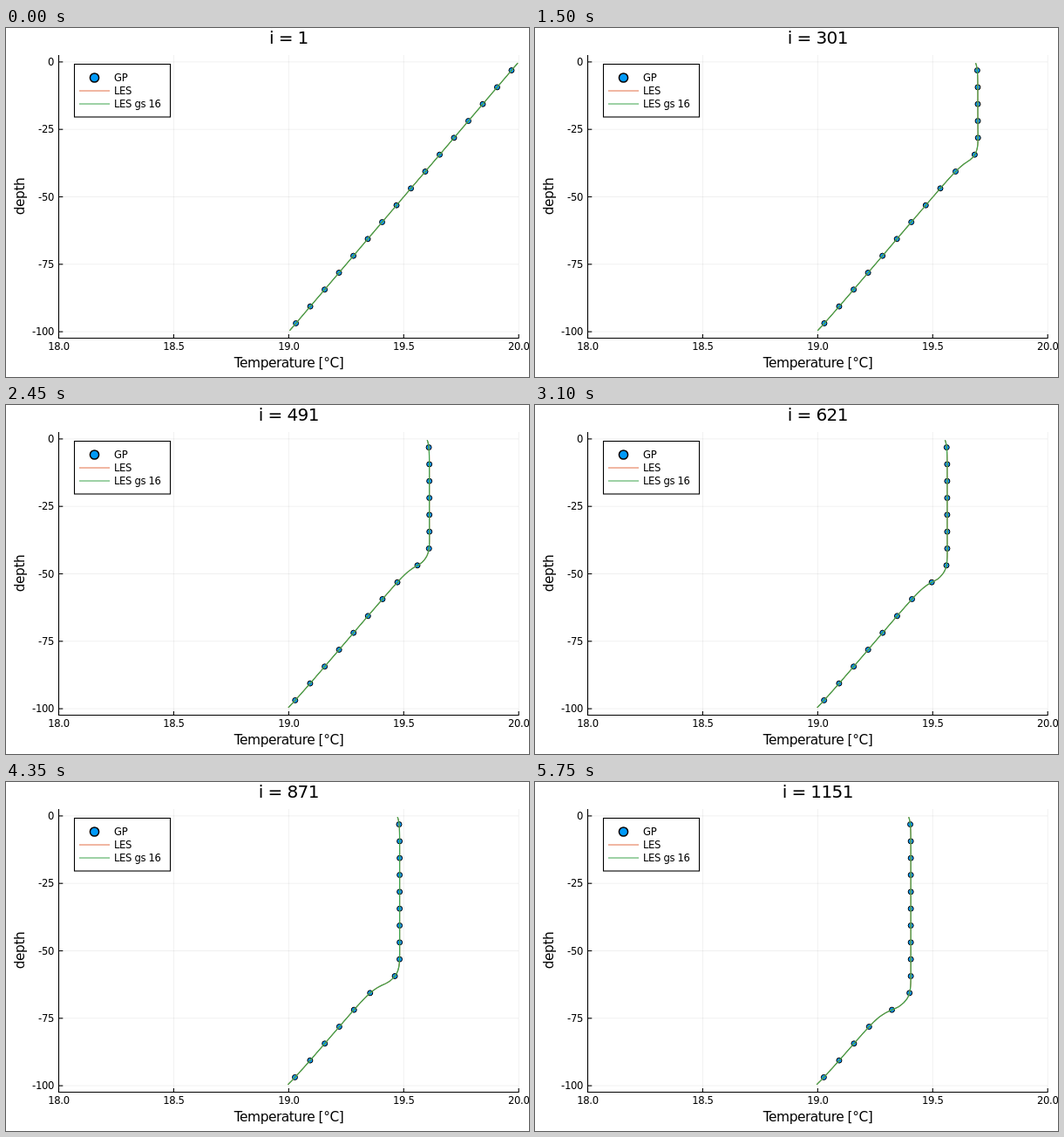
Animation of 600 by 400 pixels, one loop 5800 ms. Source, as an HTML page with a canvas:

```html
<!DOCTYPE html>
<html>
<head>
<meta charset="utf-8">
<style>
html, body { margin: 0; width: 100%; height: 100%; overflow: hidden; background: #fff; }
canvas { display: block; }
</style>
</head>
<body>
<canvas id="stage" width="600" height="400"></canvas>
<script>
const ctx = document.getElementById('stage').getContext('2d');
const BLUE = '#009af9', ORANGE = '#e26f46', GREEN = '#3da44d';
const STEP = 50, STEPS = 116;
const X_SCALE = 263.85;            // pixels per degree
const xOf = temp => 588.2 + (temp - 20) * X_SCALE;
const yOf = depth => 38.9 + depth * 3.092;

function line(points, color, width = 1.1) {
  ctx.beginPath();
  points.forEach(([x, y]) => ctx.lineTo(x, y));
  ctx.strokeStyle = color;
  ctx.lineWidth = width;
  ctx.stroke();
}

function dot(x, y, r, width) {
  ctx.beginPath();
  ctx.arc(x, y, r, 0, 2 * Math.PI);
  ctx.fillStyle = BLUE;
  ctx.fill();
  ctx.strokeStyle = '#000';
  ctx.lineWidth = width;
  ctx.stroke();
}

function text(str, x, y, size, align = 'center') {
  ctx.font = size + 'px "DejaVu Sans", sans-serif';
  ctx.letterSpacing = -0.03 * size + 'px';
  ctx.textAlign = align;
  ctx.fillStyle = '#000';
  ctx.fillText(str, x, y);
}

// A mixed layer cools and deepens with the square root of time.
function temperature(depth, k) {
  const initial = 20 - depth / 100;
  if (!k) return initial;
  const drop = 0.0555 * Math.sqrt(k);
  const base = 120.5 * drop - 0.7;
  const u = depth - base;
  const decay = u < 0 ? 0.42 * Math.max(1, 15 / base) * u : 2.1 * Math.asinh(u / 2.6);
  const mixed = 1 / (1 + Math.exp(decay));
  const surface = 0.0114 * Math.exp(-depth / 2);
  const bottom = 0.0055 * Math.sqrt(k / 115) * Math.exp((depth - 97) / 5);
  return initial + (20 - drop - initial) * mixed - surface - bottom;
}

function drawAxes() {
  const temps = [18, 18.5, 19, 19.5, 20], depths = [0, 25, 50, 75, 100];
  const grid = 'rgba(0,0,0,0.1)';
  for (const t of temps) line([[xOf(t), 31], [xOf(t), 355.5]], grid, 0.6);
  for (const d of depths) line([[60.5, yOf(d)], [588, yOf(d)]], grid, 0.6);
  line([[60.5, 31], [60.5, 356]], '#000');
  line([[60, 355.5], [588.5, 355.5]], '#000');
  for (const t of temps) {
    line([[xOf(t), 355.5], [xOf(t), 351]], '#000');
    text(t.toFixed(1), xOf(t), 369, 11.6);
  }
  for (const d of depths) {
    line([[60.5, yOf(d)], [65.3, yOf(d)]], '#000');
    text(String(d && -d), 55, yOf(d) + 4, 11.6, 'right');
  }
  text('Temperature [°C]', 324.5, 389, 15.4);
  ctx.save();
  ctx.translate(21, 193);
  ctx.rotate(-Math.PI / 2);
  text('depth', 0, 0, 15.4);
  ctx.restore();
}

function drawLegend() {
  ctx.fillStyle = '#fff';
  ctx.fillRect(78.5, 41.5, 110, 60.5);
  ctx.strokeStyle = '#000';
  ctx.lineWidth = 1.1;
  ctx.strokeRect(78.5, 41.5, 110, 60.5);
  dot(101.5, 57, 5.1, 1.5);
  line([[84, 72], [119, 72]], ORANGE, 1);
  line([[84, 87], [119, 87]], GREEN, 1);
  ['GP', 'LES', 'LES gs 16'].forEach((s, n) => text(s, 124, 61.3 + 15 * n, 11.6, 'left'));
}

function draw(k) {
  ctx.fillStyle = '#fff';
  ctx.fillRect(0, 0, 600, 400);
  drawAxes();
  const place = d => [xOf(temperature(d, k)), yOf(d)];
  for (let n = 0; n < 16; n++) dot(...place(3.125 + 6.25 * n), 3, 1);
  const curve = Array.from({ length: 128 }, (_, n) => place((n + 0.5) / 1.28));
  line(curve, ORANGE);
  line(curve, GREEN, 1.25);
  drawLegend();
  text('i = ' + (1 + 10 * k), 324.3, 17.8, 20);
}

const start = performance.now();
function tick() {
  draw(Math.floor((performance.now() - start) / STEP) % STEPS);
  requestAnimationFrame(tick);
}
tick();
</script>
</body>
</html>
```
